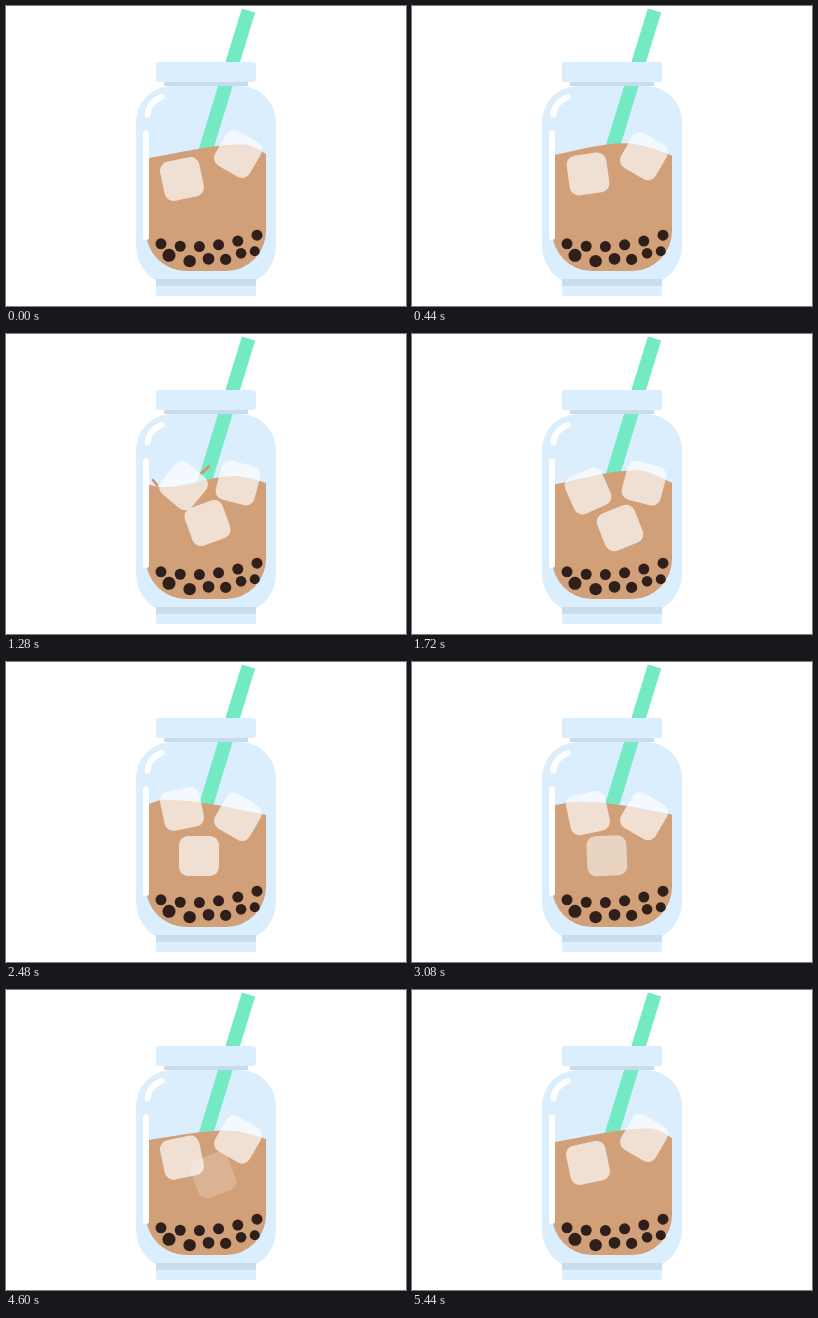
An HTML page with a canvas for the animation above (5480 ms loop, 400 px wide and 300 px high).

```html
<!DOCTYPE html>
<html lang="en">
<head>
<meta charset="utf-8">
<title>Iced bubble tea</title>
<style>
html, body { margin: 0; width: 400px; height: 300px; overflow: hidden; background: #fff; }
canvas { display: block; }
</style>
</head>
<body>
<canvas id="stage" width="400" height="300"></canvas>
<script>
const ctx = document.getElementById('stage').getContext('2d');
const LOOP = 5480, STEP = 40;
const GLASS = '#dbeefd', RIM = '#c8dceb', STRAW = '#74eac4', TEA = '#d1a079', PEARL = '#2f1f1a';

const mix = (a, b, p) => a + (b - a) * p;
const ramp = (t, from, length) => Math.min(1, Math.max(0, (t - from) / length));
const smooth = p => p * p * (3 - 2 * p);
const easeOut = p => 1 - (1 - p) ** 2;

// Turning points of the slosh: 1 is high on the right, -1 high on the left
const turns = [[0, 1], [800, -.1], [1480, .95], [2480, -1], [LOOP, 1]];

function sloshAt(t) {
  const i = turns.findIndex(([time]) => time > t);
  const [t0, a] = turns[i - 1], [t1, b] = turns[i];
  return mix(a, b, smooth((t - t0) / (t1 - t0)));
}

function box(color, x, y, w, h, r = 0) {
  ctx.fillStyle = color;
  ctx.beginPath();
  ctx.roundRect(x, y, w, h, r);
  ctx.fill();
}

function line(color, width, cap, x1, y1, x2, y2) {
  ctx.strokeStyle = color;
  ctx.lineWidth = width;
  ctx.lineCap = cap;
  ctx.beginPath();
  ctx.moveTo(x1, y1);
  ctx.lineTo(x2, y2);
  ctx.stroke();
}

function dot(x, y, r) {
  ctx.fillStyle = PEARL;
  ctx.beginPath();
  ctx.arc(x, y, r, 0, 7);
  ctx.fill();
}

function cube(x, y, angle, opacity = 1) {
  ctx.save();
  ctx.translate(x, y);
  ctx.rotate(angle * Math.PI / 180);
  ctx.globalAlpha = opacity;
  box('rgba(255,255,255,.67)', -20, -20, 40, 40, 9);
  ctx.restore();
}

function jar() {
  box(GLASS, 130, 80, 140, 200, [36, 36, 40, 40]);
  line(STRAW, 14, 'butt', 242.5, 4.5, 197, 153);
  box(RIM, 158, 75, 84, 5);
  box(GLASS, 150, 56, 100, 20, 3);
  box(RIM, 150, 273, 100, 7);
  box(GLASS, 150, 280, 100, 10, [0, 0, 2, 2]);
}

// One crest travels along the surface; the impact dents its left slope
function tea(t, slosh) {
  const dent = 6 * Math.exp(-(((t - 1260) / 150) ** 2));
  const left = 147 + 5 * slosh, right = 150.5 - 2.5 * slosh;
  const x = 198 + 40 * slosh;
  const y = 138.5 - 2.5 * Math.sin(2 * Math.PI * t / LOOP) + dent;
  ctx.fillStyle = TEA;
  ctx.beginPath();
  ctx.moveTo(140, left + 1);
  ctx.lineTo(143, left);
  ctx.bezierCurveTo(mix(143, x, .35), mix(left, y, .4) + 2 * dent, mix(x, 143, .35), y, x, y);
  ctx.bezierCurveTo(mix(x, 260, .35), y, mix(260, x, .3), mix(right, y, .4), 260, right);
  ctx.arcTo(260, 265, 200, 265, 40);
  ctx.arcTo(140, 265, 140, 200, 40);
  ctx.fill();
}

// Two arched rows
function pearls() {
  for (let i = 0; i < 6; i++) {
    const top = 155 + 19.2 * i, low = 163 + 21.5 * i - .87 * i * i;
    dot(top, 240.7 - .0028 * (top - 187) ** 2, 5.5);
    dot(low, 254.3 - .0036 * (low - 195) ** 2 + (i % 2 ? 1.3 : -1.3), 6.5 - .3 * i);
  }
}

function splash(t) {
  const p = (t - 1120) / 280;
  if (p <= 0 || p >= 1) return;
  const from = Math.max(0, p - .24), to = Math.min(1, p + .1);
  for (const [x, y, dx, dy] of [[187, 147, 24, -22], [155, 156, -12, -15]])
    line('#d3906e', 2.5, 'round', x + dx * from, y + dy * from, x + dx * to, y + dy * to);
}

function cubes(t, slosh) {
  const afloat = 165 + 8 * slosh;

  // The new cube drops in, tumbles a quarter turn and settles on the left
  const fall = smooth(ramp(t, 600, 800));
  const lift = 13.4 * ((LOOP - t) / 3760) ** 1.3;
  cube(mix(201, 176, fall), mix(95, afloat - lift, fall),
    -12 + 90 * easeOut(ramp(t, 760, 1500)), ramp(t, 560, 220));

  const nudge = Math.exp(-(((t - 1500) / 450) ** 4));
  cube(232, 151.5 - 3.5 * slosh, 30 - 16 * nudge);

  // The old cube is pushed under, then melts
  const sink = smooth(ramp(t, 1000, 400)), melt = ramp(t, 2480, 3000);
  cube(mix(176, 202 + 9 * slosh, sink), mix(afloat, 194 - 25 * melt ** 3, sink),
    mix(-6 - 6 * slosh, -13 - 13 * slosh, sink), 1 - melt);
}

function shine() {
  line('#fff', 6, 'round', 140, 127, 140, 231);
  ctx.beginPath();
  ctx.moveTo(141.5, 108.5);
  ctx.quadraticCurveTo(143, 96, 155.5, 91);
  ctx.stroke();
}

function draw(t) {
  const slosh = sloshAt(t);
  ctx.clearRect(0, 0, 400, 300);
  jar();
  tea(t, slosh);
  pearls();
  splash(t);
  cubes(t, slosh);
  shine();
}

const start = performance.now();
function tick() {
  const t = (performance.now() - start) % LOOP;
  draw(t - t % STEP);
  requestAnimationFrame(tick);
}
tick();
</script>
</body>
</html>
```
